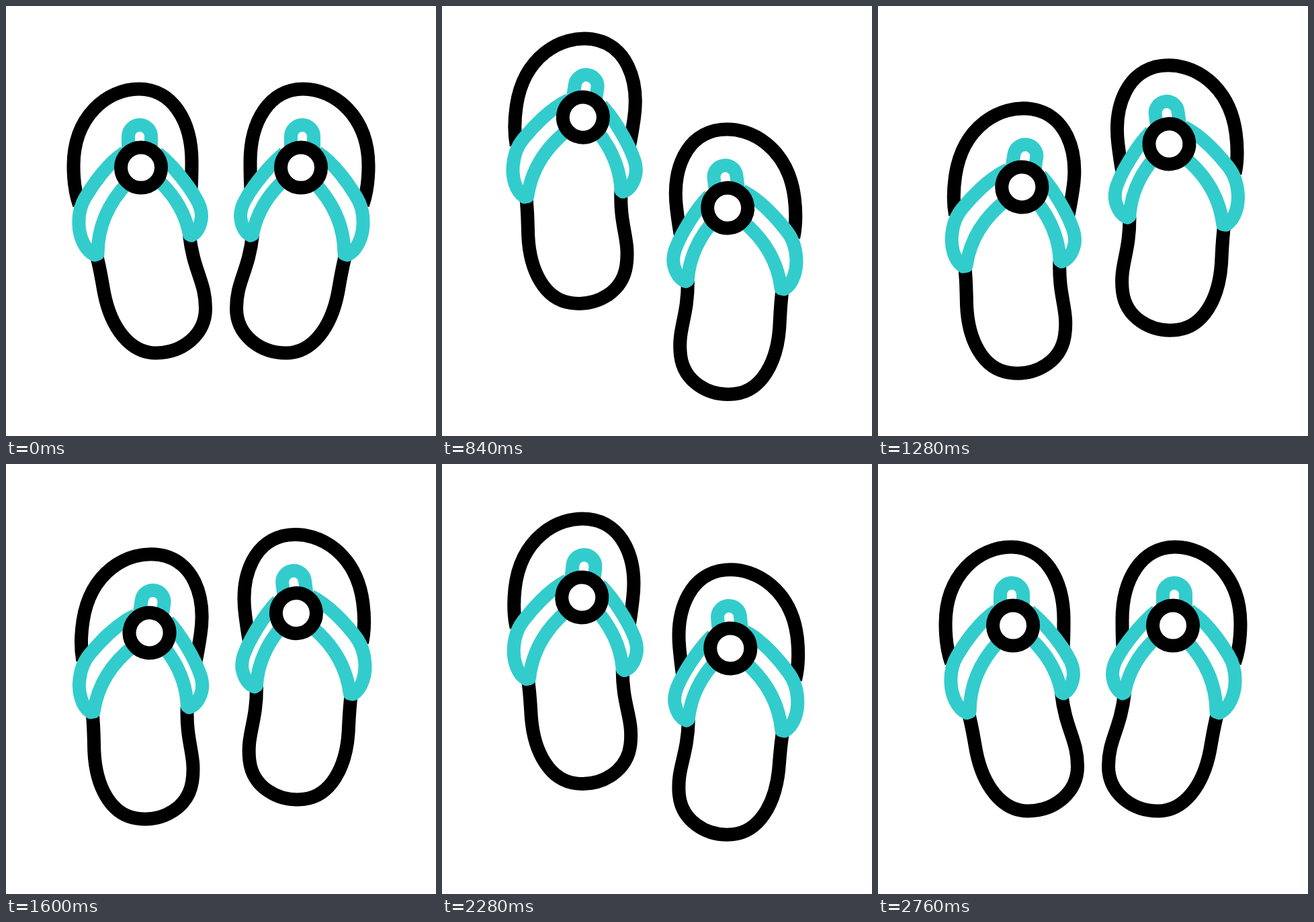
Write an HTML page that moves like this. It is 640 px wide and 640 px high and loops after 2800 ms.

```html
<!DOCTYPE html>
<html lang="en">
<head>
<meta charset="utf-8">
<title>Flip-flops</title>
<style>
  html, body { margin: 0; width: 100%; height: 100%; overflow: hidden; background: #fff; }
  svg { display: block; width: 100%; height: 100%; }
  .line { fill: none; stroke: #000; stroke-width: 20; }
  .strap { stroke: #33cccc; stroke-linejoin: round; }
  .button { fill: #fff; }
</style>
</head>
<body>
<svg viewBox="0 0 640 640">
  <defs>
    <g id="shoe">
      <path class="line" d="M109 296C103.5 280 100.5 260 100.5 238C100.5 165 150 123.5 198 123.5
        C248 123.5 276.5 172 276.5 232C276.5 246 276.5 258 275.5 272"/>
      <path class="line" d="M134 368C140 390 142 405 146 427C156 478 184 516.5 223 516.5
        C264 516.5 297 488 297 450C297 410 279 395 273 341"/>
      <path class="line strap" d="M182 224V194a17 17 0 0 1 34 0V224"/>
      <path class="line strap" d="M176 218C150 235 128 268 118 285C110 298 108 313 108.5 325
        C109 343 117 364 132 370.5L136.5 369C136.5 335 147 299 181 263"/>
      <path class="line strap" d="M226 219C250 238 275 272 283 287C291 300 291 308 291 313
        C290 328 284 338 276 341.5L273 340C268 314 255 284 222 255"/>
      <circle class="line button" cx="201" cy="240.5" r="30"/>
    </g>
  </defs>
  <g id="left"><use href="#shoe"/></g>
  <g id="right"><use href="#shoe" transform="matrix(-1 0 0 1 640 0)"/></g>
</svg>
<script>
  const LOOP = 2800, STEP = 40;

  // Tracks are lists of [time, value]; every span eases in and out.
  const stride = (a, b) => [[200, 0], [800, a], [1400, b], [2000, a], [2600, 0]];
  const turn = deg => [[260, 0], [900, deg], [2040, deg], [2760, 0]];

  const shoes = [
    { id: "left", cx: 199, x: stride(-2.8, 1.9), y: stride(-77.5, 40), r: turn(8.6) },
    { id: "right", cx: 441, x: stride(-4.4, 5.2), y: stride(60.7, -47.2), r: turn(-7.1) }
  ];
  for (const s of shoes) s.el = document.getElementById(s.id);

  function valueAt(track, t) {
    if (t <= track[0][0]) return track[0][1];
    for (let i = 1; i < track.length; i++) {
      const [t0, v0] = track[i - 1], [t1, v1] = track[i];
      if (t <= t1) {
        const u = (t - t0) / (t1 - t0);
        return v0 + (v1 - v0) * u * u * (3 - 2 * u);
      }
    }
    return track[track.length - 1][1];
  }

  function draw(time) {
    const t = Math.floor(time / STEP) * STEP;
    for (const { el, cx, x, y, r } of shoes) {
      const [dx, dy, deg] = [x, y, r].map(track => valueAt(track, t));
      el.setAttribute("transform", `translate(${dx} ${dy}) rotate(${deg} ${cx} 320)`);
    }
  }

  const start = performance.now();
  function tick() {
    draw((performance.now() - start) % LOOP);
    requestAnimationFrame(tick);
  }
  tick();
</script>
</body>
</html>
```
